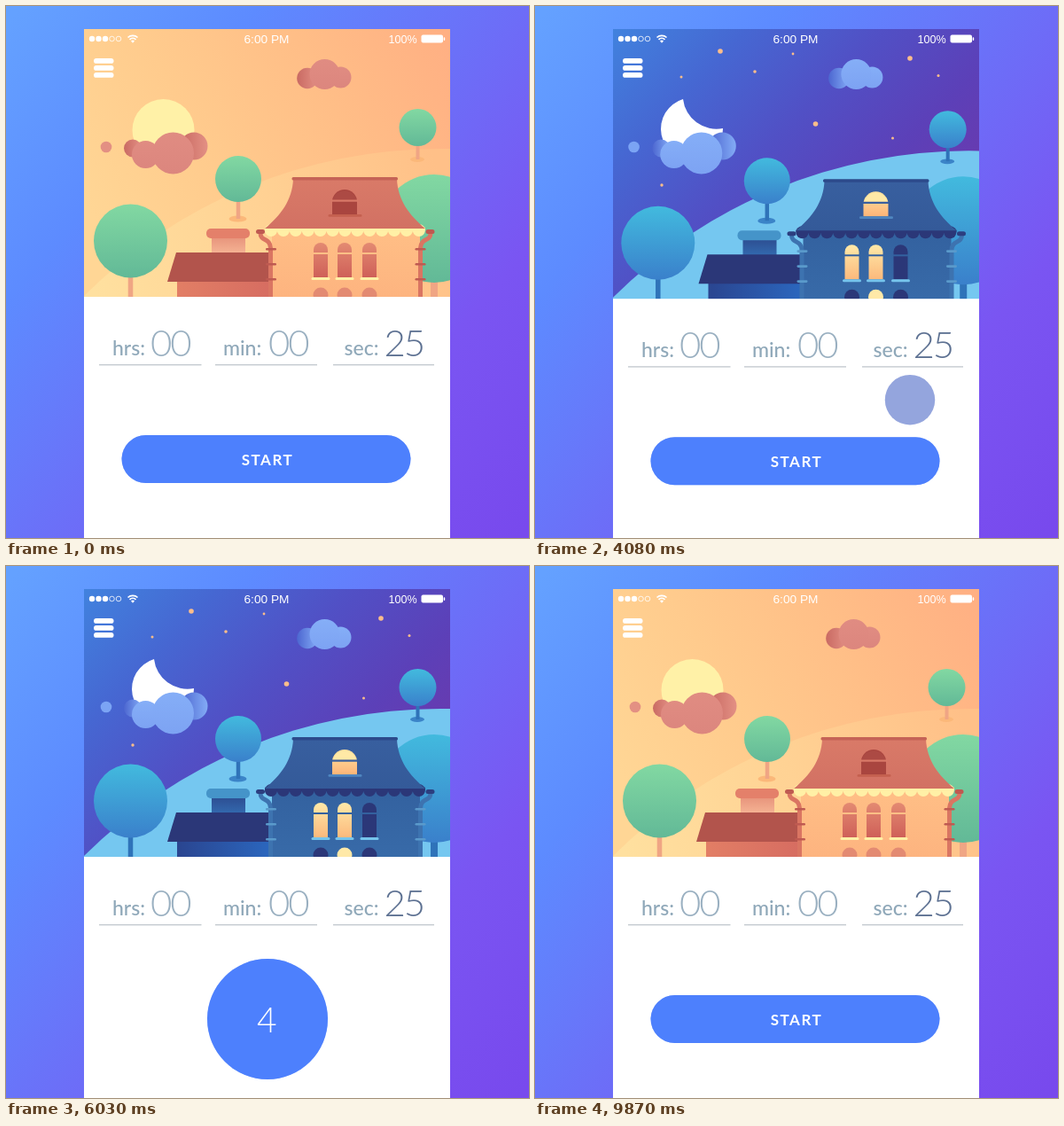
Recreate the animation shown at these times as an HTML page. Size 590x600 px, loop 9900 ms.

```html
<!DOCTYPE html>
<html lang="en">
<head>
<meta charset="utf-8">
<title>Day and night timer</title>
<style>
html, body { margin: 0; width: 100%; height: 100%; overflow: hidden; background: #6a70f8; }
svg { display: block; }
.bar { font: 13.7px "Liberation Sans", Arial, sans-serif; fill: #fff; }
.label { font: 500 23px Lato, sans-serif; fill: #8fa8b9; }
.digit { font: 300 42px Lato, sans-serif; letter-spacing: -2px; fill: #9ab0c1; }
.start { font: 700 17px Lato, sans-serif; letter-spacing: 1.5px; fill: #fff; text-anchor: middle; }
.count { font: 300 39px Lato, sans-serif; letter-spacing: -2.5px; fill: #fff; text-anchor: middle; }
</style>
</head>
<body>
<svg id="stage" width="590" height="600" viewBox="0 0 590 600"></svg>
<script>
const LOOP = 9900;
const PULL = 39.5;

const day = {
  id: 'd',
  sky: ['#ffd695', '#ffcb8d', '#ffbe87', '#ffb083'], skyLine: [110, 260, 500, 50],
  hill: ['#ffe09f', '#ffd294', '#ffc088'], tree: ['#82d8a2', '#62b997'], trunk: '#f0a584', shade: '#fbb87a',
  cloud: ['#e08c82', '#dc867e'], back: ['#c96a63', '#e39084'], dot: '#e39083',
  chimney: ['#e58f78', '#f6b595'], cap: '#e4806a', shedRoof: '#b2544c', shed: ['#e27e65', '#d66c61'],
  wall: ['#ffbf86', '#fdb37f'], roof: ['#d97a68', '#d27163'], ridge: '#c56356', trim: '#fff0a6',
  pipe: '#da7562', head: '#bf5a51', bracket: '#bf5a51', arch: '#ac4a44', attic: ['#a9453f', '#a9453f'],
  sill: '#c5604f', glass: ['#e38a72', '#cf6058'], dark: ['#e38a72', '#cf6058'], ledge: '#fff0a6'
};
const night = {
  id: 'n',
  sky: ['#4182de', '#4667d2', '#5150c5', '#5c40b8', '#6d38ac'], skyLine: [88, 26, 400, 330],
  hill: ['#75c7f0', '#75c7f0'], tree: ['#42bade', '#3a80cb'], trunk: '#2f73b9', shade: '#3b84c8',
  cloud: ['#85aef7', '#7da3f3'], back: ['#4c66d0', '#83abf6'], dot: '#7ba4f4',
  chimney: ['#2c4a8e', '#336bb0'], cap: '#4594c9', shedRoof: '#2b3778', shed: ['#2a4590', '#2b68c0'],
  wall: ['#33619f', '#386ba9'], roof: ['#385f9f', '#345a99'], ridge: '#2c4a8b', trim: '#2b3778',
  pipe: '#3d73b0', head: '#2c3f80', bracket: '#5a9acb', arch: '#ffe9a6', attic: ['#ffe3a0', '#fcb478'],
  sill: '#4f86c0', glass: ['#ffe9a8', '#fcb97c'], dark: ['#2b3778', '#2b3778'], ledge: '#76c4ec'
};

const circle = (x, y, r, fill) => `<circle cx="${x}" cy="${y}" r="${r}" fill="${fill}"/>`;
const rect = (x, y, w, h, fill, r = 0) =>
  `<rect x="${x}" y="${y}" width="${w}" height="${h}" rx="${r}" fill="${fill}"/>`;
const path = (d, fill, more = '') => `<path d="${d}" fill="${fill}" ${more}/>`;
const text = (x, y, cls, s, more = '') => `<text x="${x}" y="${y}" class="${cls}" ${more}>${s}</text>`;

// A part slides by kx, ky per pulled pixel and by push while the wipe passes.
const part = (kx, ky, push, body) => `<g class="part" data-k="${kx},${ky},${push}">${body}</g>`;

const stops = list => list.map((c, i) =>
  `<stop offset="${i / (list.length - 1)}" stop-color="${c}"/>`).join('');
const line = (id, [x1, y1, x2, y2], list) =>
  `<linearGradient id="${id}" gradientUnits="userSpaceOnUse" x1="${x1}" y1="${y1}" x2="${x2}" y2="${y2}">${stops(list)}</linearGradient>`;

function gradients(p) {
  const across = ['back', 'shed'];
  const down = ['tree', 'cloud', 'chimney', 'wall', 'roof', 'attic', 'glass', 'dark'];
  return line(p.id + 'sky', p.skyLine, p.sky) + line(p.id + 'hill', [100, 320, 490, 190], p.hill) +
    [...across, ...down].map(k => {
      const end = across.includes(k) ? 'x2="1" y2="0"' : 'x2="0" y2="1"';
      return `<linearGradient id="${p.id}${k}" x1="0" y1="0" ${end}>${stops(p[k])}</linearGradient>`;
    }).join('');
}

function tree(p, x, y, r, base, w, shade) {
  const foot = shade ? `<ellipse cx="${x - .5}" cy="${base}" rx="${shade}" ry="${shade * .36}" fill="${p.shade}"/>` : '';
  return foot + rect(x - w / 2, y + r - 3, w, base - y - r + 3, p.trunk) + circle(x, y, r, `url(#${p.id}tree)`);
}

function arched(x, y, w, h, fill, bar) {
  const r = w / 2;
  return path(`M${x} ${y + h}V${y + r}A${r} ${r} 0 0 1 ${x + w} ${y + r}V${y + h}Z`, fill) +
    rect(x - .5, y + r + 3, w + 1, 2, bar);
}

function house(p) {
  const u = k => `url(#${p.id}${k})`;
  let s = rect(300, 250, 167, 84, u('wall'));
  [347, 374, 402].forEach((x, i) => {
    s += arched(x, 267, 16, 39, u(i < 2 ? 'glass' : 'dark'), p.wall[0]) +
      rect(x - 2.5, 306, 21, 3, p.ledge, 1.5) +
      circle(x + 8, 326, 8.5, i === 1 ? p.glass[0] : p.dark[0]);
  });
  s += rect(292, 249, 181, 5, p.trim, 2);
  for (let i = 0; i < 13; i++) s += circle(299 + i * 13.9, 253, 7, p.trim);
  s += path('M324 195H441C442 219 455 236 473 251H292C310 236 323 219 324 195Z', u('roof'));
  s += rect(322.5, 193, 119.5, 3.5, p.ridge, 1.5);
  s += path('M368 235V221A14 14 0 0 1 396 221V235Z', u('attic')) +
    path('M368.5 218.5A14 14 0 0 1 395.5 218.5Z', p.arch) +
    rect(367, 218.5, 30, 2.2, p.roof[0]) + rect(363.5, 235, 38, 2.8, p.sill, 1.4);
  const pipe = d => path(d, 'none', `stroke="${p.pipe}" stroke-width="5"`);
  s += pipe('M287 256C287 266 298 261 298.5 273V334') + pipe('M479 256C479 266 468 261 467.5 273V334') +
    rect(282, 252, 10, 5, p.head, 2.5) + rect(473.5, 252, 10, 5, p.head, 2.5);
  for (const y of [273, 290, 307])
    s += rect(293, y, 12, 2.6, p.bracket, 1.3) + rect(461.5, y, 12, 2.6, p.bracket, 1.3);
  return s;
}

function scene(p) {
  const u = k => `url(#${p.id}${k})`;
  const stars = [[209, 51, 2.8], [165, 80, 1.5], [143, 202, 1.7], [248, 74, 1.8], [291, 54, 1.4],
    [316.5, 133, 2.8], [403.5, 149, 1.5], [423, 59, 2.8], [455, 78.5, 1.5]];
  const orb = p === day ? circle(177.5, 140, 35, '#fff1a7')
    : path('M167 105A35 35 0 1 0 212 138A38 38 0 0 1 167 105Z', '#fff');
  return rect(88, 26, 413, 380, u('sky')) +
    (p === night ? stars.map(s => circle(...s, '#fbbd8b')).join('') : '') +
    part(0, 0, 31, orb) +
    part(-.66, 0, 1, circle(113, 159, 6.3, p.dot)) +
    part(-.33, 0, -11, circle(143, 160.5, 10, u('back')) + circle(212, 158, 15.5, u('back'))) +
    part(-.33, 0, -9, circle(157.5, 167.5, 15.5, u('cloud')) + circle(188.5, 166, 23.5, u('cloud'))) +
    part(1.32, 0, 0, circle(340, 81.5, 11.8, u('back')) + circle(377.5, 80.5, 12, u('cloud')) +
      circle(359.5, 77, 17, u('cloud'))) +
    part(-.25, 1.04, 0, circle(490, 731, 570, u('hill'))) +
    part(.54, 1.03, 0, tree(p, 464.5, 137, 21, 173, 4, 8)) +
    part(.1, 1.03, 0, tree(p, 483, 251, 61, 336, 8, 0)) +
    part(-.1, 1.03, 0, tree(p, 262, 195, 26, 240, 4.5, 10)) +
    part(-.78, 1.04, 0, tree(p, 140.5, 265, 41.5, 336, 5.5, 0)) +
    part(1.14, 1.04, 0,
      rect(232, 258, 38, 22, u('chimney')) + rect(226, 251, 49, 11, p.cap, 5) +
      rect(193, 310, 110, 24, u('shed')) + path('M192 278H303V311H182Z', p.shedRoof) + house(p));
}

function statusBar() {
  let s = '';
  for (let i = 0; i < 5; i++) {
    const full = i < 3;
    s += `<circle cx="${97 + i * 7.5}" cy="37" r="${full ? 3.2 : 2.8}" fill="${full ? '#fff' : 'none'}" stroke="#fff" stroke-width="${full ? 0 : .8}"/>`;
  }
  s += path('M137.5 35.5A8 8 0 0 1 148.5 35.5M139.5 37.8A5 5 0 0 1 146.5 37.8', 'none', 'stroke="#fff" stroke-width="1.7"') +
    path('M141 39.5A3 3 0 0 1 145 39.5L143 41.8Z', '#fff');
  s += text(268.5, 42, 'bar', '6:00 PM') + text(431.5, 42, 'bar', '100%', 'style="font-size:12.6px"');
  s += rect(468.5, 32.5, 24.5, 9, '#fff', 2) + rect(493.7, 35.3, 1.5, 3.6, '#fff', .7);
  for (const y of [59, 67, 75]) s += rect(99, y, 22.5, 5.8, '#fff', 2.9);
  return s;
}

function field(x, w, labelX, label, digitX, digits, tone) {
  return text(labelX, 394, 'label', label) +
    text(digitX, 394.5, 'digit', digits, tone ? `style="fill:${tone}"` : '') +
    rect(x, 404, w, 1.4, '#c5cbd0');
}

const stage = document.getElementById('stage');
stage.innerHTML = `<defs>
  ${line('bg', [0, 20, 620, 550], ['#64a1ff', '#5d8bff', '#6b70f8', '#7a55f2', '#7849ed'])}
  ${gradients(day)}${gradients(night)}
  ${line('edge', [0, 0, 0, 0], ['#fff', '#000'])}
  <mask id="wipe" maskUnits="userSpaceOnUse" x="0" y="0" width="590" height="600">${rect(0, 0, 590, 600, 'url(#edge)')}</mask>
  <clipPath id="phone">${rect(88, 26, 413, 574, '#fff')}</clipPath>
</defs>
${rect(0, 0, 590, 600, 'url(#bg)')}
<g clip-path="url(#phone)">
  <g>${scene(day)}</g>
  <g mask="url(#wipe)">${scene(night)}</g>
  ${statusBar()}
  <g id="panel">
    ${rect(88, 328, 413, 300, '#fff')}
    ${field(105, 115.5, 120, 'hrs:', 163, '00')}
    ${field(236, 115, 245, 'min:', 296, '00')}
    ${field(369, 114, 381.5, 'sec:', 426.5, '25', '#5d7192')}
    <rect id="trail" fill="#4d80fd" opacity=".4"/>
    <rect id="button" fill="#4d80fd"/>
    ${text(295, 518, 'start', 'START', 'id="start"')}
    ${text(293, 526, 'count', '0', 'id="count"')}
    <circle id="touch" cx="423" cy="442" fill="#4d69c6"/>
  </g>
</g>`;

const cycles = [
  { down: 15, full: 150, pull: 60, release: 370, count: [848, 2248], wipe: [1012, 2307], back: 2330, dir: 1 },
  { down: 3880, full: 4115, pull: 3910, release: 5070, count: [5735, 7526], wipe: [6120, 7981], back: 7990, dir: -1 }
];

const clamp = v => Math.min(1, Math.max(0, v));
const ramp = (t, a, b) => clamp((t - a) / (b - a));
const ease = v => .5 - .5 * Math.cos(Math.PI * v);
const step = (t, a, b) => ease(ramp(t, a, b));
const set = (node, attrs) => { for (const k in attrs) node.setAttribute(k, attrs[k]); };
const [button, trail, start, count, touch, panel, edge] =
  ['button', 'trail', 'start', 'count', 'touch', 'panel', 'edge'].map(id => document.getElementById(id));
const parts = [...document.querySelectorAll('.part')].map(node => ({ node, k: node.dataset.k.split(',').map(Number) }));

function shape(c, t) {
  const { release: r, back: b } = c;
  const narrow = step(t, r - 95, r + 5) - step(t, b + 110, b + 280);
  const tall = step(t, r, r + 150) - step(t, b, b + 140);
  return { w: 326 - 190 * narrow, h: 54 + 82 * tall, x: 293.5 + 1.5 * tall, tall };
}

function drawButton(node, s) {
  set(node, { x: s.x - s.w / 2, y: 511 - s.h / 2, width: s.w, height: s.h, rx: s.h / 2 });
}

function draw(t) {
  const c = t < 3500 ? cycles[0] : cycles[1];
  const pull = PULL * (step(t, c.pull, c.release - 30) - (1 - (1 - ramp(t, c.release, c.release + 330)) ** 3));
  const w = ramp(t, ...c.wipe);
  const push = step(w, 0, .3) - step(w, .3, .65);
  for (const { node, k } of parts)
    node.setAttribute('transform', `translate(${k[0] * pull + k[2] * push} ${k[1] * pull})`);
  panel.setAttribute('transform', `translate(0 ${pull})`);

  const x = w <= 0 ? 70 : w >= 1 ? 520 : 88 + 413 * w;
  set(edge, { x1: x - 3 * c.dir, x2: x + 3 * c.dir });

  const s = shape(c, t);
  drawButton(button, s);
  drawButton(trail, shape(c, t - 7));
  start.setAttribute('opacity', clamp(1 - 2 * s.tall));
  count.setAttribute('opacity', clamp(2 * s.tall - 1));
  count.textContent = Math.floor(25 * ramp(t, ...c.count));
  set(touch, { r: 33 * ramp(t, c.down, c.full), opacity: .6 * (1 - ramp(t, c.release, c.release + 150)) });
}

const begin = performance.now();
function tick() {
  draw((performance.now() - begin) % LOOP);
  requestAnimationFrame(tick);
}
draw(0);
requestAnimationFrame(tick);
</script>
</body>
</html>
```
